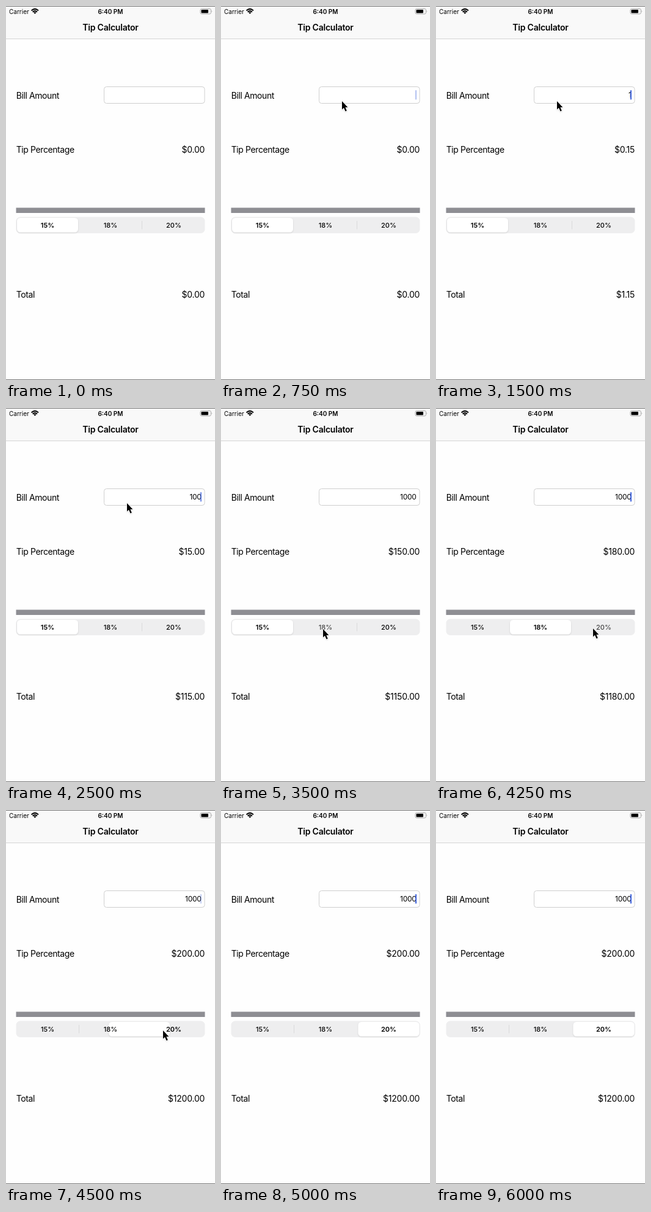
Write an HTML page that moves like this. It is 342x609 px and loops after 6.5 s.

```html
<!DOCTYPE html>
<html lang="en">
<head>
<meta charset="utf-8">
<title>Tip Calculator</title>
<style>
  html, body { margin: 0; width: 100%; height: 100%; overflow: hidden; background: #fefefe; }
  svg { display: block; width: 100%; height: 100%; }
  text { font: 14px Inter, Roboto, sans-serif; letter-spacing: -.4px; fill: #000; }
  .title { font-weight: 600; letter-spacing: -.22px; }
  .amount { letter-spacing: -.2px; }
  .status { font-size: 10px; letter-spacing: 0; }
  .clock { font-weight: 600; }
  .field { font-size: 12px; letter-spacing: -.3px; }
  .segment { font-size: 11px; font-weight: 500; letter-spacing: 0; }
  .segment.selected { font-weight: 600; }
  .segment.pressed { fill: #444; }
  .middle { text-anchor: middle; }
  .end { text-anchor: end; }
</style>
</head>
<body>
<svg viewBox="0 0 342 609">
  <defs>
    <filter id="shadow" x="-20%" y="-20%" width="140%" height="150%">
      <feDropShadow dx="0" dy="1" stdDeviation="1" flood-opacity=".15"/>
    </filter>
  </defs>

  <rect width="342" height="53" fill="#f9f9f9"/>
  <path d="M0 53.5H342" stroke="#d4d4d4"/>
  <path d="M0 .5H342M0 608.5H342" stroke="#777"/>

  <text class="status" x="5" y="12.5">Carrier</text>
  <g fill="none" stroke="#000" stroke-width="2">
    <path d="M41.6 7.4Q47.3 2.4 53 7.4M43.7 9.7Q47.3 6.6 50.9 9.7"/>
    <path d="M45.2 10.7Q47.3 9.2 49.4 10.7L47.3 13Z" fill="#000" stroke="none"/>
  </g>
  <text class="status clock middle" x="171" y="12.5">6:40 PM</text>
  <rect x="318" y="4.5" width="17.5" height="8.5" rx="2.4" fill="none" stroke="#aaa"/>
  <rect x="319.5" y="6" width="11.5" height="5.5" rx="1" fill="#000"/>
  <path d="M336.7 7.3Q338.3 8.8 336.7 10.3Z" fill="#aaa"/>

  <text class="title middle" x="171" y="40">Tip Calculator</text>
  <text x="16.7" y="151">Bill Amount</text>
  <rect x="160.5" y="131.5" width="164.5" height="27" rx="4" fill="#fff" stroke="#cfcfcf"/>
  <text id="bill" class="field end" x="319.5" y="149"></text>
  <rect id="caret" x="318" y="137" width="2" height="15.5" rx=".8" fill="#3f63dc"/>
  <text x="16.7" y="238.5">Tip Percentage</text>
  <text id="tip" class="amount end" x="325.2" y="238.5"></text>

  <rect x="16.5" y="328.5" width="309" height="8.5" fill="#8e8e93"/>
  <rect x="16.5" y="343.5" width="309" height="26.5" rx="6.5" fill="#eeeeef"/>
  <path id="divider" d="M0 350V363.5" stroke="#d9d9db"/>
  <rect id="thumb" y="345" width="100" height="23.5" rx="5.5" fill="#fff" filter="url(#shadow)"/>
  <text class="segment middle" x="68" y="360.5">15%</text>
  <text class="segment middle" x="171" y="360.5">18%</text>
  <text class="segment middle" x="274.5" y="360.5">20%</text>

  <text x="16.7" y="475">Total</text>
  <text id="total" class="amount end" x="325.2" y="475"></text>

  <path id="cursor" d="M0 0V13.4L3 10.7L5.5 16.5L7.8 15.5L5.4 10H9.4Z" fill="#000"
        stroke="#fff" stroke-width="1.2" paint-order="stroke" filter="url(#shadow)"/>
</svg>
<script>
const LOOP = 6500;
const RATES = [15, 18, 20];
const DIVIDERS = [222.5, null, 119.5];

// Each step changes only the listed properties and holds until the next one.
const steps = [
  { at: 0, bill: '', selected: 0, thumb: 18, pressed: -1, caret: 0, cursor: null },
  { at: 250, cursor: [200, 92] },
  { at: 500, cursor: [198, 130] },
  { at: 750, cursor: [198, 155], caret: .4 },
  { at: 1000, caret: 1 },
  { at: 1500, bill: '1' },
  { at: 1750, bill: '10' },
  { at: 2000, bill: '100' },
  { at: 2500, caret: .75 },
  { at: 2750, bill: '1000', caret: 1 },
  { at: 3250, cursor: [186, 339], caret: .8 },
  { at: 3500, cursor: [167, 360], caret: 0, pressed: 1 },
  { at: 3750, selected: 1, thumb: 60, pressed: -1, caret: .4 },
  { at: 4000, cursor: [246, 361], thumb: 121, caret: .9 },
  { at: 4250, cursor: [257, 359], pressed: 2, caret: 1 },
  { at: 4500, selected: 2, thumb: 168, pressed: -1, caret: .3 },
  { at: 4750, cursor: null, thumb: 224.5, caret: 0 },
  { at: 5000, caret: 1 },
  { at: 5500, caret: 0 },
  { at: 6000, caret: 1 }
];

const el = id => document.getElementById(id);
const segments = document.querySelectorAll('.segment');
const money = value => '$' + value.toFixed(2);

function place(node, position) {
  node.style.display = position ? '' : 'none';
  if (position) node.setAttribute('transform', `translate(${position})`);
}

function render(now) {
  const time = now % LOOP;
  const state = Object.assign({}, ...steps.filter(step => step.at <= time));
  const bill = Number(state.bill);
  const tip = bill * RATES[state.selected] / 100;
  const divider = DIVIDERS[state.selected];

  el('bill').textContent = state.bill;
  el('tip').textContent = money(tip);
  el('total').textContent = money(bill + tip);
  el('caret').setAttribute('opacity', state.caret);
  el('thumb').setAttribute('x', state.thumb);
  place(el('divider'), divider && [divider, 0]);
  place(el('cursor'), state.cursor);
  segments.forEach((segment, i) => {
    segment.classList.toggle('selected', i === state.selected);
    segment.classList.toggle('pressed', i === state.pressed);
  });
}

const start = performance.now();
function tick() {
  render(performance.now() - start);
  requestAnimationFrame(tick);
}
tick();
</script>
</body>
</html>
```
